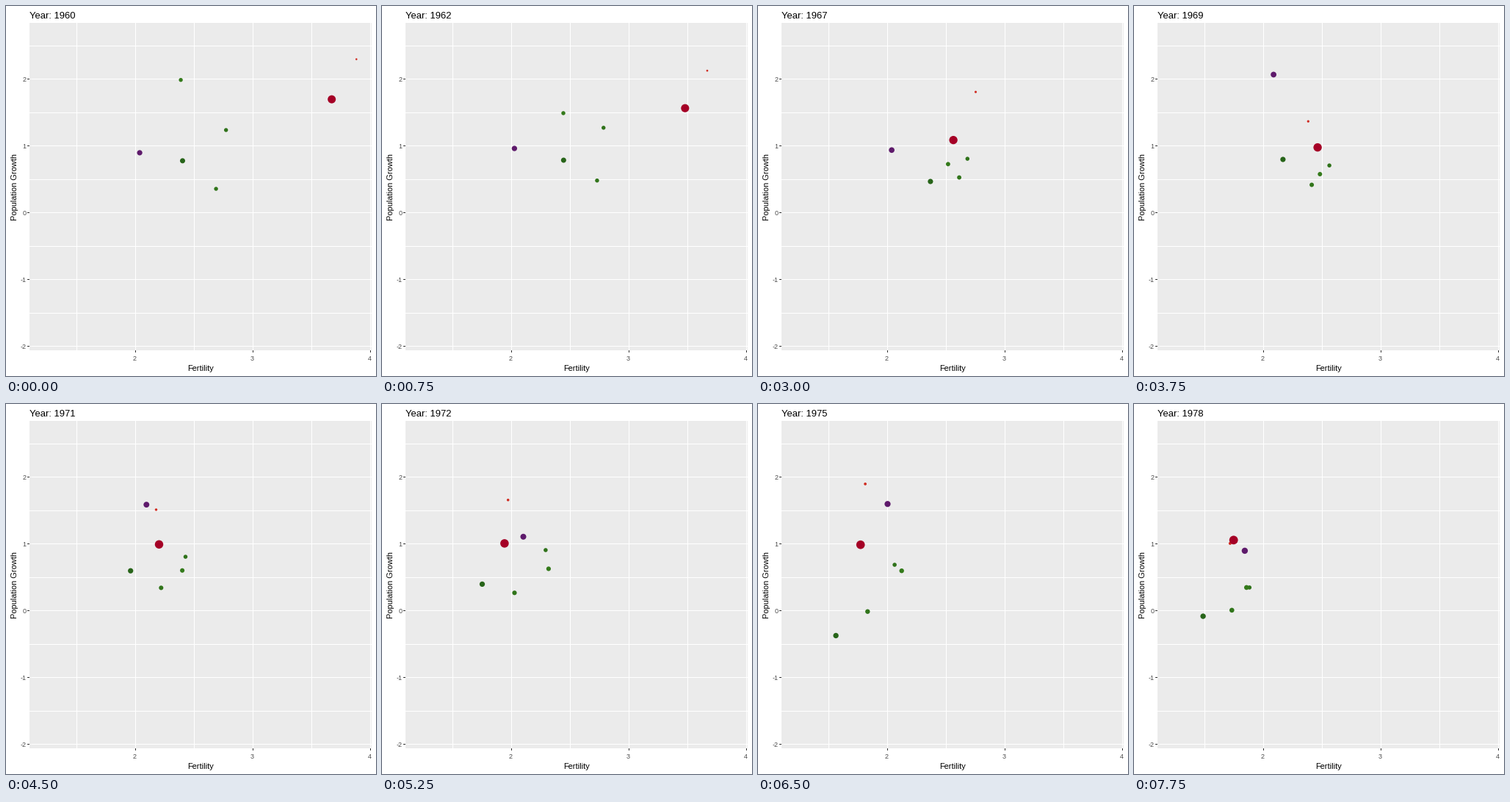
A matplotlib script for the animation above (8000 ms loop, 504 by 504 pixels).

```python
import matplotlib
import matplotlib.pyplot as plt
import numpy as np
from matplotlib.animation import FuncAnimation
from matplotlib.patches import Circle, Rectangle

SIZE, DPI = 504, 72
FRAMES, INTERVAL = 32, 250
YEARS_PER_FRAME = 58 / 99
LEFT, TOP, RIGHT, BOTTOM = 32, 23, 498, 469
TURNS = np.array([0, 7, 12, 15, 21, 26, 31])   # frames where the paths bend

matplotlib.rcParams["font.family"] = "Liberation Sans"

fig = plt.figure(figsize=(SIZE / DPI, SIZE / DPI), dpi=DPI, facecolor="white")
ax = fig.add_axes([0, 0, 1, 1])
ax.set_xlim(0, SIZE)
ax.set_ylim(SIZE, 0)
ax.axis("off")


def to_x(fertility):
    return 176.5 + 160 * (np.asarray(fertility) - 2)


def to_y(growth):
    return 281.8 - 91 * np.asarray(growth)


def box(x, y, w, h, color):
    ax.add_patch(Rectangle((x, y), w, h, fc=color, lw=0, zorder=1))


def label(x, y, text, size, color="black", **kw):
    return ax.text(x, y, text, fontsize=size, color=color,
                   va="baseline", **kw)


class Country:
    """A dot that runs straight between its turning points."""

    def __init__(self, color, radii, fertility, growth):
        self.radii = radii
        self.xs, self.ys = to_x(fertility), to_y(growth)
        self.dot = Circle((0, 0), 1, fc=color, lw=0, zorder=3)
        ax.add_patch(self.dot)

    def move(self, frame):
        self.dot.center = (np.interp(frame, TURNS, self.xs),
                           np.interp(frame, TURNS, self.ys))
        self.dot.radius = np.interp(frame, (0, FRAMES - 1), self.radii)


# Panel, grid and axes
box(LEFT, TOP, RIGHT - LEFT, BOTTOM - TOP, "#EBEBEB")
for half in range(-4, 6):
    y = int(to_y(half / 2))
    box(LEFT, y, RIGHT - LEFT, 1, "white")
    if half % 2 == 0:
        box(LEFT - 3, y, 3, 1, "#333333")
        label(27.5, y + 4, str(half // 2), 9, "#4D4D4D", ha="right")
for half in range(3, 9):
    x = int(to_x(half / 2))
    box(x, TOP, 1, BOTTOM - TOP, "white")
    if half % 2 == 0:
        box(x, BOTTOM, 1, 3, "#333333")
        label(x - 0.5, 483, str(half // 2), 9, "#4D4D4D", ha="center")

label(265, 497, "Fertility", 11, ha="center")
label(15, 246.5, "Population Growth", 11, ha="center", rotation=90,
      rotation_mode="anchor")
title = label(32, 17, "", 13)

countries = [
    # Canada
    Country("#D02C22", (1.3, 2.0),
            (3.88, 3.38, 2.75, 2.38, 1.97, 1.81, 1.715),
            (2.30, 1.90, 1.81, 1.37, 1.66, 1.90, 1.01)),
    # France
    Country("#2F721A", (2.7, 2.8),
            (2.77, 2.80, 2.68, 2.56, 2.29, 2.06, 1.88),
            (1.24, 1.32, 0.81, 0.71, 0.91, 0.69, 0.35)),
    # Germany
    Country("#276419", (3.5, 3.7),
            (2.40, 2.50, 2.365, 2.165, 1.75, 1.56, 1.485),
            (0.78, 0.80, 0.47, 0.80, 0.40, -0.37, -0.08)),
    # Italy
    Country("#347A1B", (2.7, 3.3),
            (2.385, 2.515, 2.515, 2.48, 2.315, 2.12, 1.855),
            (1.99, 0.83, 0.73, 0.58, 0.63, 0.60, 0.35)),
    # Japan
    Country("#5E1A6B", (3.6, 4.2),
            (2.035, 2.01, 2.035, 2.085, 2.10, 2.00, 1.84),
            (0.90, 1.05, 0.94, 2.07, 1.11, 1.60, 0.90)),
    # United Kingdom
    Country("#31751B", (2.7, 3.3),
            (2.685, 2.785, 2.61, 2.41, 2.025, 1.83, 1.73),
            (0.36, 0.65, 0.53, 0.42, 0.27, -0.01, 0.01)),
    # United States
    Country("#A50026", (5.5, 5.9),
            (3.67, 3.22, 2.56, 2.46, 1.94, 1.77, 1.745),
            (1.70, 1.39, 1.09, 0.98, 1.01, 0.99, 1.06)),
]


def draw(frame):
    title.set_text(f"Year: {round(1960 + frame * YEARS_PER_FRAME)}")
    for country in countries:
        country.move(frame)
    return [title] + [c.dot for c in countries]


anim = FuncAnimation(fig, draw, frames=FRAMES, interval=INTERVAL,
                     repeat=True, repeat_delay=0, blit=False)
plt.show()
```
